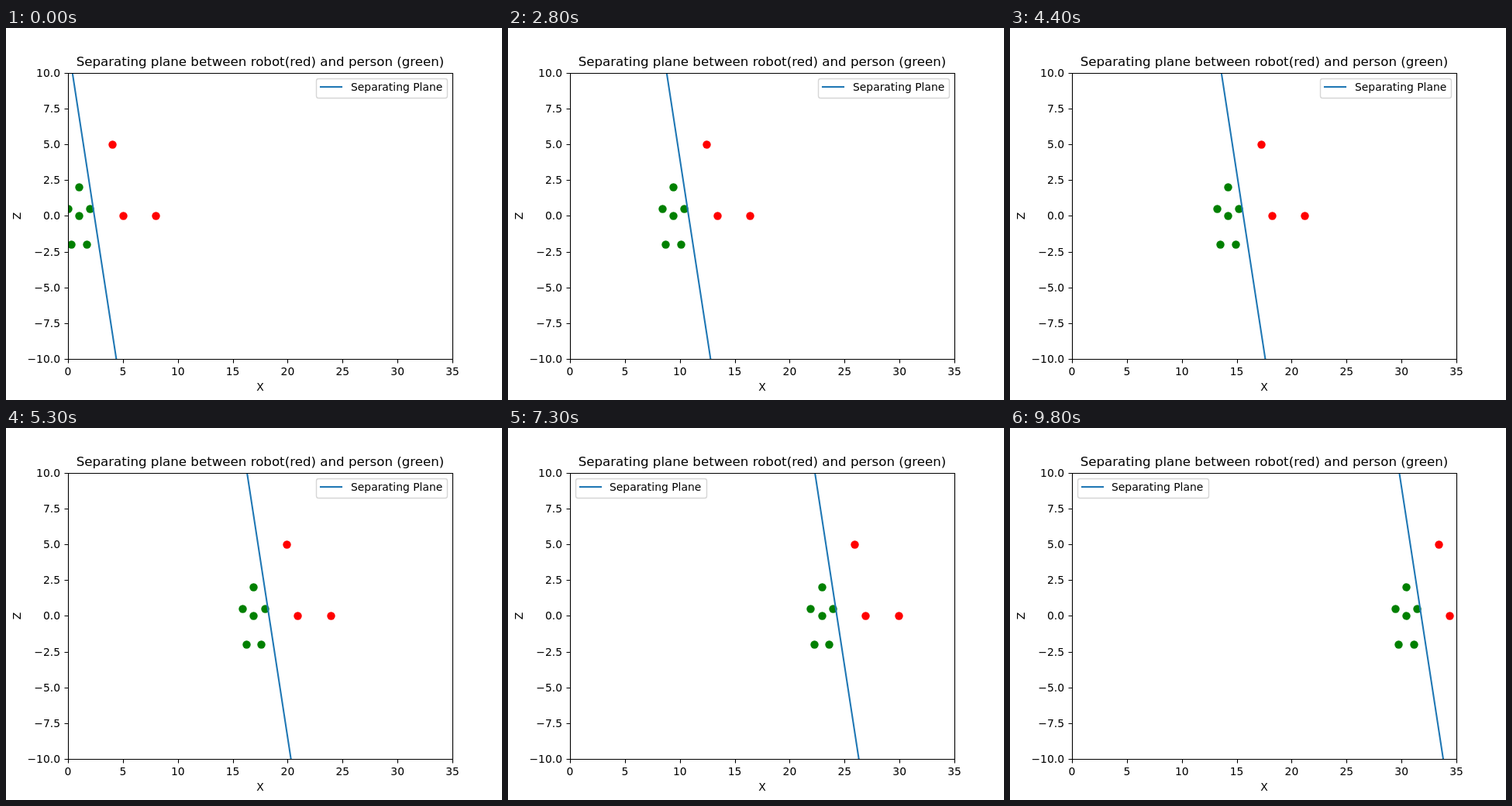
Animation, 640 px wide and 480 px high, one loop 9.9 s. Source, as an HTML page:

```html
<!DOCTYPE html>
<html lang="en">
<head>
<meta charset="utf-8">
<title>Separating plane</title>
<style>
  html, body { margin: 0; width: 100%; height: 100%; overflow: hidden; background: #fff; }
  svg { display: block; width: 640px; height: 480px; }
  text { font: 13.889px "DejaVu Sans", sans-serif; fill: #000; }
  .title { font-size: 16.667px; }
  .mid { text-anchor: middle; }
  .end { text-anchor: end; }
  .axis { fill: none; stroke: #000; stroke-width: 1.11; }
  .plane { fill: none; stroke: #1f77b4; stroke-width: 2.083; stroke-linecap: square; }
  .box { fill: #fff; stroke: #ccc; stroke-width: 1.389; opacity: .8; }
</style>
</head>
<body>
<svg viewBox="0 0 640 480">
  <defs><clipPath id="area"><rect x="80" y="58" width="496" height="369"/></clipPath></defs>
  <rect width="640" height="480" fill="#fff"/>
  <g id="plot" clip-path="url(#area)"></g>
  <g id="axes"></g>
  <text class="title mid" x="328" y="49">Separating plane between robot(red) and person (green)</text>
  <text class="mid" x="328" y="468">X</text>
  <text class="mid" transform="translate(19 242.4) rotate(-90)">Z</text>
  <g id="legend">
    <rect class="box" x="87.5" y="65.5" width="169" height="25" rx="2.78"/>
    <path class="plane" d="M93 76H120"/>
    <text x="131" y="81">Separating Plane</text>
  </g>
</svg>
<script>
const STEP = 100, STEPS = 99, SPEED = 0.3, LEGEND_SWITCH = 73;
const person = [[0, 0.5], [1, 2], [2, 0.5], [1, 0], [0.3, -2], [1.7, -2]];
const robot = [[4, 5], [5, 0], [8, 0]];

const px = x => 80 + x * 496 / 35;
const py = z => 242.4 - z * 18.48;
const snap = v => Math.floor(v + 0.5 + 1e-6) + 0.5;
const get = id => document.getElementById(id);

function add(parent, tag, attrs, text) {
  const el = document.createElementNS("http://www.w3.org/2000/svg", tag);
  for (const k in attrs) el.setAttribute(k, attrs[k]);
  if (text) el.textContent = text;
  return parent.appendChild(el);
}

function buildAxes() {
  const axes = get("axes");
  let d = "M80.5 58.5H576.5V427.5H80.5Z";
  for (let x = 0; x <= 35; x += 5) {
    d += `M${snap(px(x))} 427.5v5`;
    add(axes, "text", { class: "mid", x: px(x), y: 448 }, String(x));
  }
  for (let z = -10; z <= 10; z += 2.5) {
    d += `M80.5 ${snap(py(z))}h-5`;
    const label = (z < 0 ? "\u2212" : "") + Math.abs(z).toFixed(1);
    add(axes, "text", { class: "end", x: 70, y: Math.round(py(z) + 5) }, label);
  }
  add(axes, "path", { class: "axis", d });
}

function makeDots(points, fill) {
  return points.map(([x, z]) => ({
    x, el: add(get("plot"), "circle", { cy: snap(py(z)), r: 5.2, fill })
  }));
}

buildAxes();
const dots = [...makeDots(robot, "#f00"), ...makeDots(person, "#008000")];
const plane = add(get("plot"), "path", { class: "plane" });

// The plane is 5x + z = 12, carried along with both bodies.
const planeX = z => (12 - z) / 5;

function draw(ms) {
  const n = Math.floor(ms / STEP + 1e-6) % STEPS;
  const shift = n * SPEED;
  for (const dot of dots) dot.el.setAttribute("cx", snap(px(dot.x + shift)));
  plane.setAttribute("d",
    `M${px(planeX(11) + shift)} ${py(11)}L${px(planeX(-11) + shift)} ${py(-11)}`);
  get("legend").setAttribute("transform", `translate(${n < LEGEND_SWITCH ? 313 : 0} 0)`);
  // The label sits one pixel further from the box edge on the right side.
  get("legend").lastElementChild.setAttribute("x", n < LEGEND_SWITCH ? 132 : 131);
}

let start;
function tick(now) {
  if (start === undefined) start = now;
  draw(now - start);
  requestAnimationFrame(tick);
}
draw(0);
requestAnimationFrame(tick);
</script>
</body>
</html>
```
